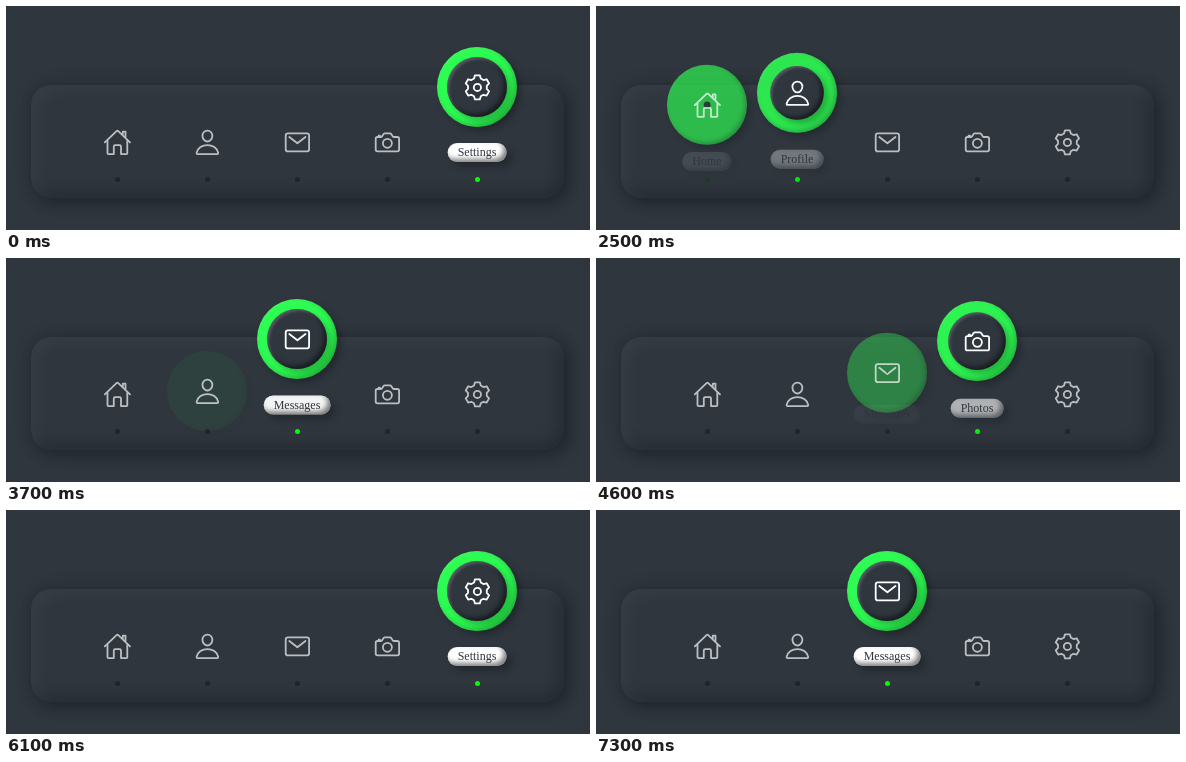
These frames come from a looping animation (584x224 px, 8 s). An HTML page:

```html
<!DOCTYPE html>
<html lang="en">
<head>
<meta charset="utf-8">
<title>Navigation</title>
<style>
html, body { margin: 0; width: 100%; height: 100%; overflow: hidden; background: #2f363e; }
body { position: relative; }
.bar {
  position: absolute; left: 25px; top: 79px; width: 533px; height: 113px; border-radius: 20px;
  background: #2f363e;
  box-shadow: 5px 5px 15px rgba(0,0,0,.25), 0 0 18px rgba(0,0,0,.16),
    inset 5px 5px 15px rgba(255,255,255,.055), inset -5px -5px 15px rgba(0,0,0,.22);
}
.item { position: absolute; top: 0; width: 0; height: 224px; }
.icon { position: absolute; top: 136px; transform: translateY(calc(var(--lift) * -55px)); }
.icon > *, .dot { position: absolute; border-radius: 50%; }
.ring {
  left: -40px; top: -40px; width: 80px; height: 80px; background: #2dfc52; opacity: var(--lift);
  box-shadow: 4px 4px 7px rgba(0,0,0,.25), inset 1px 1px 3px rgba(255,255,255,.12),
    inset -2px -2px 5px rgba(0,0,0,.28);
}
.hub {
  left: -30px; top: -30px; width: 60px; height: 60px; background: #2f363e; transform: scale(var(--glow));
  box-shadow: 5px 5px 7px rgba(0,0,0,.25), inset 2px 2px 3px rgba(255,255,255,.2),
    inset -3px -3px 5px rgba(0,0,0,.5);
}
.icon > svg {
  left: -14.4px; top: -14.4px; width: 28.8px; height: 28.8px; border-radius: 0; overflow: visible;
  fill: none; stroke: #fff; stroke-width: 32; stroke-linecap: round; stroke-linejoin: round;
  opacity: calc(.68 + .32 * var(--glow));
}
.label {
  position: absolute; top: 137px; height: 19px; padding: 0 10px; border-radius: 12px;
  font: 12px/19px "Liberation Serif", "Times New Roman", serif; white-space: nowrap;
  color: #2f363e; background: #fff; opacity: var(--text);
  transform: translate(-50%, calc((1 - var(--text)) * 10px));
  box-shadow: 5px 5px 7px rgba(0,0,0,.25), inset 2px 2px 3px rgba(255,255,255,.25),
    inset -3px -3px 5px rgba(0,0,0,.5);
}
.dot { left: -2.5px; top: 170.5px; width: 5px; height: 5px; background: #20242b; }
.dot::after {
  content: ""; position: absolute; inset: 0; border-radius: 50%; background: #0f0; opacity: var(--glow);
}
</style>
</head>
<body>
<div class="bar"></div>
<script>
function gear() {
  const corners = [[-20.8, 169], [-11.4, 219], [11.4, 219], [20.8, 169]];
  const points = [];
  for (let tooth = 0; tooth < 360; tooth += 60)
    for (const [angle, r] of corners) {
      const a = (tooth + angle) * Math.PI / 180;
      points.push((256 + r * Math.sin(a)).toFixed(1) + "," + (256 - r * Math.cos(a)).toFixed(1));
    }
  return `<polygon points="${points.join(" ")}"/><circle cx="256" cy="256" r="64"/>`;
}

const menu = [
  ["Home", `<path d="M80 212v236a16 16 0 0016 16h96V328a24 24 0 0124-24h80a24 24 0 0124 24v136h96a16 16 0 0016-16V212
    M480 256L267 52q-11-8-22 0L32 256M400 179V64h-48v69"/>`],
  ["Profile", `<path d="M344 144c-4 53-44 96-88 96s-84-43-88-96c-4-55 35-96 88-96s92 42 88 96z
    M256 304c-87 0-175 48-192 139-2 11 5 21 16 21h352c11 0 18-10 16-21C431 352 343 304 256 304z"/>`],
  ["Messages", `<rect x="48" y="96" width="416" height="320" rx="40"/><path d="M112 160l144 112 144-112"/>`],
  ["Photos", `<path d="M350 149l-26-42q-9-11-22-11h-92q-13 0-22 11l-27 42q-9 11-21 11H80a32 32 0 00-32 32v192
    a32 32 0 0032 32h352a32 32 0 0032-32V192a32 32 0 00-32-32h-59q-13 0-23-11zM124 158v-22h-24v22"/>
    <circle cx="256" cy="272" r="80"/>`],
  ["Settings", gear()]
];
const first = 4;
const clicks = [[1105, 0], [2195, 1], [3145, 2], [4223, 3], [4950, 4], [6540, 2]];
const LOOP = 8000, DURATION = 500, DELAY = 200;

const items = menu.map(([name, art], i) => {
  const el = document.createElement("div");
  el.className = "item";
  el.style.left = 111 + 90 * i + "px";
  el.innerHTML = `<div class="icon"><div class="ring"></div><div class="hub"></div>
    <svg viewBox="0 0 512 512">${art}</svg></div><div class="label">${name}</div><div class="dot"></div>`;
  return document.body.appendChild(el);
});

// cubic-bezier(.25, .1, .25, 1)
function ease(x) {
  if (x <= 0) return 0;
  if (x >= 1) return 1;
  const bezier = (s, a, b) => 3 * a * s * (1 - s) ** 2 + 3 * b * s * s * (1 - s) + s ** 3;
  let lo = 0, hi = 1;
  for (let n = 0; n < 24; n++) {
    const mid = (lo + hi) / 2;
    if (bezier(mid, .25, .25) < x) lo = mid; else hi = mid;
  }
  return bezier(lo, .1, 1);
}

function level(i, t, delayIn, delayOut) {
  let active = first, value = i === first ? 1 : 0;
  for (const [start, next] of clicks) {
    if (next === i) value += ease((t - start - delayIn) / DURATION);
    if (active === i) value -= ease((t - start - delayOut) / DURATION);
    active = next;
  }
  return Math.min(1, Math.max(0, value)).toFixed(4);
}

function draw(t) {
  items.forEach(({ style }, i) => {
    style.setProperty("--lift", level(i, t, 0, DELAY));
    style.setProperty("--glow", level(i, t, 0, 0));
    style.setProperty("--text", level(i, t, DELAY, 0));
  });
}

const begin = performance.now();
function tick() {
  draw((performance.now() - begin) % LOOP);
  requestAnimationFrame(tick);
}
tick();
</script>
</body>
</html>
```
